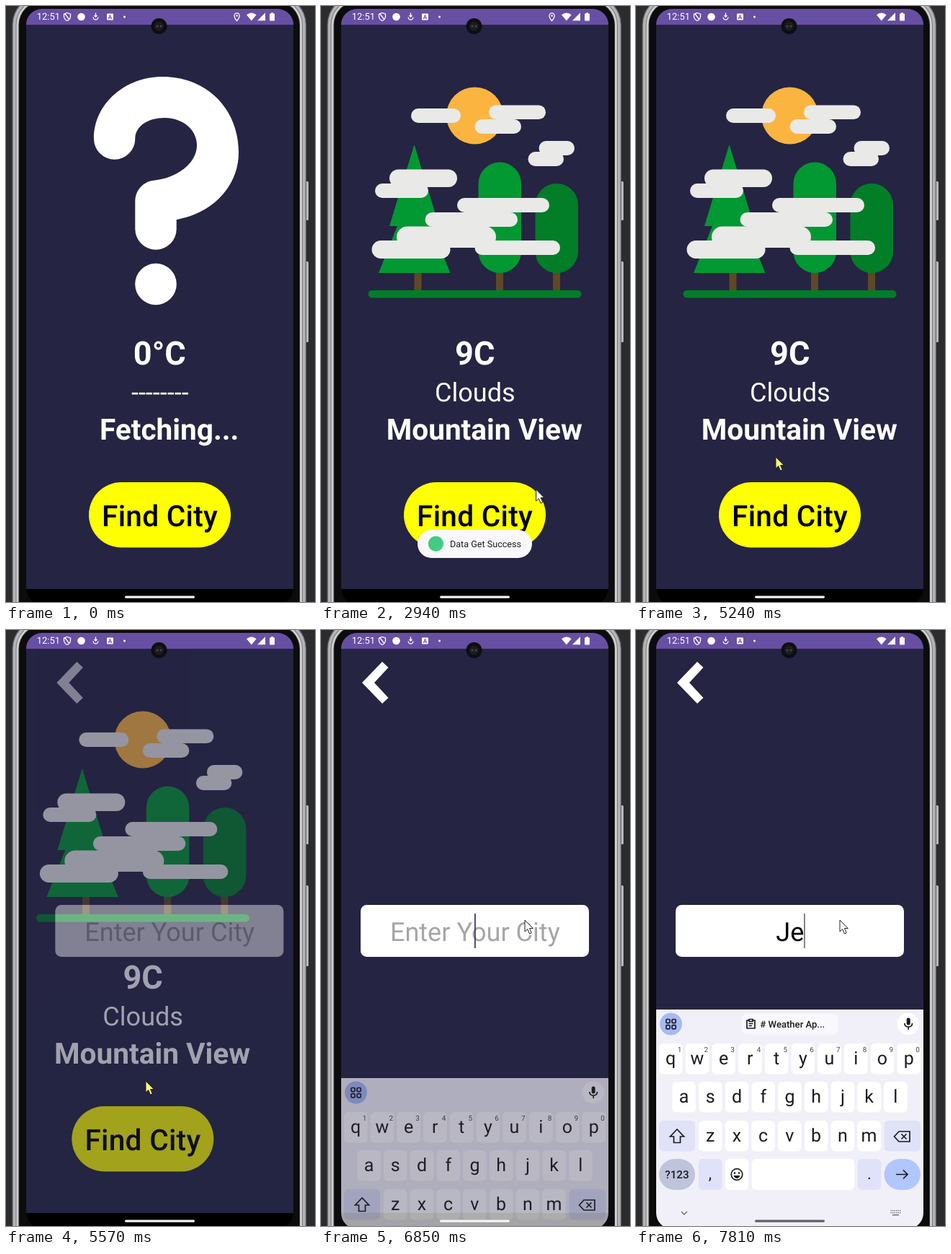
Recreate the animation shown at these times as an HTML page. Size 429 by 826 pixels, loop 8 s.

```html
<!DOCTYPE html>
<html lang="en">
<head>
<meta charset="utf-8">
<title>Weather app</title>
<style>
  html, body { margin: 0; width: 100%; height: 100%; overflow: hidden; background: #2b2c2e; }
  svg { display: block; width: 100vw; height: 100vh; }
  text { font-family: Roboto, sans-serif; text-rendering: geometricPrecision; }
  .mid { text-anchor: middle; }
  .line { fill: none; stroke: #1b1b21; stroke-width: 1.7; }
</style>
</head>
<body>
<svg id="stage" viewBox="0 0 429 826"></svg>
<script>
const LOOP = 8000;
const BG = '#252443', INK = '#1b1b21', TINT = '#dfe2f8';

const rect = (x, y, w, h, r, fill, more = '') =>
  `<rect x="${x}" y="${y}" width="${w}" height="${h}" rx="${r}" fill="${fill}" ${more}/>`;
const disc = (x, y, r, fill) => `<circle cx="${x}" cy="${y}" r="${r}" fill="${fill}"/>`;
const path = (d, fill, more = '') => `<path d="${d}" fill="${fill}" ${more}/>`;
const line = (d, more = '') => `<path d="${d}" class="line" ${more}/>`;
const text = (s, x, y, size, weight, fill, more = 'class="mid"') =>
  `<text x="${x}" y="${y}" font-size="${size}" font-weight="${weight}" fill="${fill}" ${more}>${s}</text>`;
const group = (id, body, more = '') => `<g id="${id}" ${more}>${body}</g>`;
const pill = (x1, y1, x2, y2, fill = '#e9e9e7') => rect(x1, y1, x2 - x1, y2 - y1, (y2 - y1) / 2, fill);

function phone() {
  // Nested outlines, from the outer edge inwards
  const rim = (inset, fill) => rect(8.5 + inset, -15 + inset, 408.5 - 2 * inset, 900, 41 - inset, fill);
  return rect(0, 0, 429, 826, 0, '#2b2c2e') +
    rect(414, 243, 6, 54, 1.5, '#b9b9bb') + rect(414, 354, 6, 112, 1.5, '#b9b9bb') +
    rim(0, '#6a6b6e') + rim(1.3, '#b4b4b6') + rim(5, '#77777a') + rim(6, '#cfcfd1') +
    rim(9, '#2a2a2c') + rim(10, '#0c0c0d');
}

function statusBar() {
  const w = '#fff', thin = 'stroke="#fff" stroke-width="1.3"';
  return rect(28, 4, 371, 22, 0, '#674fa3') +
    text('12:51', 42.7, 19.3, 13, 400, w, '') +
    path('M85 9.5L89.500 11.200V15Q89 18.500 85 20.500Q81 18.500 80.500 15V11.200ZM82 11L88 19', 'none', thin) +
    disc(104.5, 15, 5.3, w) +
    path('M124.500 9.500V15M122.500 13L124.500 15L126.500 13M121 15.500Q121.500 19 124.500 19Q127.500 19 128 15.500', 'none', thin) +
    rect(140, 10.5, 9, 9, 1, w) + text('A', 144.5, 18, 8, 700, '#674fa3') +
    disc(164.5, 15, 1.5, w) +
    group('pin', path('M320.500 20.500Q317 16.500 317 13.500A3.600 3.600 0 0 1 324.200 13.500Q324.200 16.500 320.500 20.500Z', 'none', thin) + disc(320.6, 13.5, 1.2, w)) +
    path('M334 12.200Q340.800 7 347.600 12.200L340.800 20.500Z', w) +
    path('M349 20.300L360 9.300V20.300Z', w) +
    rect(366, 10.5, 7, 10, 1, w) + rect(368, 9.3, 3, 2, 0, w);
}

function unknownIcon() {
  return path('M122 184C122 135 166 98 217 98C280 98 323 144 323 203C323 251 285 288 236.700 296V309' +
    'A28.700 28.700 0 0 1 179.300 309V270C179.300 255 192 242 207 241.500C239 238 265 217 265 193' +
    'C265 171 245 155 220 155C198 155 179.300 166 179.300 184A28.600 28.600 0 0 1 122 184Z', '#fff') +
    disc(208, 385.5, 28.8, '#fff');
}

function cloudyIcon() {
  const leaf = '#029832', dark = '#027d28';
  const clouds = [
    [125, 142, 194, 162], [233, 137.5, 312, 157], [213.5, 157, 278, 177],
    [302.5, 187, 352, 207], [287.5, 202, 337, 222], [95, 226.5, 189, 251],
    [75, 246, 149, 266], [189, 266, 317, 286], [144.5, 286, 273, 306],
    [105, 305.5, 243, 335], [70.5, 325, 179.5, 350], [213.5, 325, 332, 345]];
  return disc(213.5, 152, 39.5, '#fbb440') +
    [129.5, 243, 322].map(x => rect(x, 365, 10, 32, 0, '#5e4826')).join('') +
    path('M129.500 192L164 305H95ZM129.500 246L179.500 370H80Z', leaf) +
    rect(218.5, 216.5, 59.5, 153.5, 29.7, leaf) + rect(297.5, 246, 59.5, 124, 29.7, dark) +
    pill(65.5, 394, 361.5, 404.5, dark) +
    clouds.map(c => pill(...c)).join('');
}

function homeScreen() {
  const reading = (temp, sky, city, tempX) =>
    text(temp, tempX, 497, 45.1, 700, '#fff') + text(sky, 213.8, 547.5, 36.1, 400, '#fff') +
    text(city, 226.7, 600.7, 40.6, 700, '#fff');
  return group('before', unknownIcon() + reading('0°C', '--------', 'Fetching...', 213.3)) +
    group('after', cloudyIcon() + reading('9C', 'Clouds', 'Mountain View', 213.8)) +
    rect(115, 660, 197, 90.5, 45.2, '#ff0') +
    '<circle id="ripple" cx="205" cy="695" fill="#000" clip-path="url(#buttonShape)"/>' +
    text('Find City', 213.6, 721, 40.6, 500, '#000', 'class="mid" letter-spacing=".29"');
}

function searchScreen() {
  return rect(28, 26, 371, 782, 0, BG) +
    path('M85 44L57 73L85 102L93.500 94L74 73L93.500 52Z', '#fff') +
    rect(55, 381, 317, 72, 8.5, '#fff') +
    text('', 213.8, 431, 36.1, 400, '#000', 'class="mid" id="field"') +
    rect(0, 393, 1.8, 48, 0, '#3b4262', 'id="caret"');
}

function keyboard() {
  const letters = (row, x0, y) => [...row].map((c, i) => {
    const x = x0 + 36.72 * i;
    return rect(x, y, 32.5, 42.5, 6, '#fff') + text(c, x + 16.2, y + 29, 25, 400, INK, 'class="mid letter"');
  }).join('');
  const digits = [...'1234567890'].map((d, i) => text(d, 60.5 + 36.72 * i, 584.5, 10, 400, '#45464f')).join('');
  const squares = [41.8, 50].map(x => [539.5, 547.7].map(y =>
    rect(x, y, 5.2, 5.2, 1.5, 'none', 'class="line"')).join('')).join('');
  const chip = rect(147, 532, 133.5, 28.5, 7, '#f9f8fe') +
    line('M157 541H154V552H165V541H162M157 539.500H162V542.500H157ZM156.500 545.500H162.500M156.500 548.500H161', 'stroke-width="1.4"') +
    text('# Weather Ap...', 172.3, 550.6, 13.1, 500, INK, '');
  const grey = '#6a6b73';
  const dots = [0, 1, 2, 3, 4, 5].map(i => rect(353.5 + 2.5 * i, 804, 1.4, 1.4, 0, grey) +
    rect(353.5 + 2.5 * i, 807, 1.4, 1.4, 0, grey)).join('');
  return rect(28, 526, 371, 310, 0, '#f1f0f8') +
    disc(48.5, 546, 15.5, '#a8baf4') + squares + group('chip', chip) +
    disc(378, 546, 15.2, '#fff') + rect(375.7, 537.5, 5, 10, 2.5, INK) +
    line('M372.800 545Q373 550 378.200 550Q383.400 550 383.600 545M378.200 550V554') +
    letters('qwertyuiop', 32, 573) + digits +
    letters('asdfghjkl', 50.4, 626) + letters('zxcvbnm', 87, 680) +
    rect(32, 680, 50, 42.5, 6, TINT) + line('M57 692L47.500 702H52.500V710.500H61.500V702H66.500Z') +
    rect(344.5, 680, 50.5, 42.5, 6, TINT) +
    line('M365 695H380V709H365L358.500 702ZM368.500 698.500L375.500 705.500M375.500 698.500L368.500 705.500') +
    rect(32, 733, 50, 43, 21.5, '#bfc4dc') + text('?123', 57, 759.7, 15.2, 500, INK) +
    rect(87, 733, 32.5, 43, 6, TINT) + text(',', 103, 761, 22, 400, INK) +
    rect(123.8, 733, 32.5, 43, 6, '#fff') +
    '<circle cx="140" cy="754.500" r="7.800" class="line"/>' + disc(137, 752.5, 1.3, INK) + disc(143, 752.5, 1.3, INK) +
    path('M135.500 756H144.500Q143 760 140 760Q137 760 135.500 756Z', INK) +
    rect(160.7, 733, 142.5, 43, 6, '#fff') +
    rect(307.7, 733, 32.5, 43, 6, TINT) + text('.', 324, 761, 22, 400, INK) +
    rect(344.5, 733, 50.5, 43, 21.5, '#b1c5ff') + line('M361 754.500H377M371 748.500L377 754.500L371 760.500') +
    path('M63 806L67 810L71 806', 'none', `stroke="${grey}" stroke-width="1.4"`) +
    dots + rect(356, 810, 9, 1.4, 0, grey);
}

function toast() {
  return rect(134, 726, 159, 39, 19.5, '#f9f8fd') + disc(159.5, 745.3, 10.6, '#41cb83') +
    text('Data Get Success', 179, 750, 12.6, 400, '#1c1b1f', '');
}

document.getElementById('stage').innerHTML = `
  <defs>
    <clipPath id="screenShape">${rect(28, 4, 371, 826, 22, '#000')}</clipPath>
    <clipPath id="buttonShape">${rect(115, 660, 197, 90.5, 45.2, '#000')}</clipPath>
  </defs>` + phone() +
  group('screen', rect(28, 4, 371, 826, 0, BG) + rect(28, 808, 371, 22, 0, '#000') +
    group('home', homeScreen()) + group('search', searchScreen()) + statusBar() +
    group('keys', keyboard()) + group('toast', toast()) +
    rect(165, 817.5, 97, 3.2, 1.6, '#f4f4f4', 'id="handle"'), 'clip-path="url(#screenShape)"') +
  disc(212.5, 28, 11, '#0e0e11') + disc(212.5, 28, 6.5, '#1c1c20') +
  disc(210, 28, 1.5, '#45454c') + disc(215, 28, 1.5, '#45454c') +
  group('cursor', path('M0 0V16L3.700 12.600L6.500 19L9.200 17.800L6.500 11.500H11.300Z', '#fff',
    'id="arrow" stroke="#222" stroke-width="1" stroke-linejoin="round"'));

const $ = id => document.getElementById(id);
const set = (id, attrs) => { for (const k in attrs) $(id).setAttribute(k, attrs[k]); };
const show = (id, on) => set(id, { visibility: on ? 'visible' : 'hidden' });
const ramp = (t, a, b) => Math.min(1, Math.max(0, (t - a) / (b - a)));
const easeOut = (p, n) => 1 - (1 - p) ** n;
const letterKeys = [...document.querySelectorAll('.letter')].map(el => ({ el, c: el.textContent }));

// Pointer path: time, x, y
const route = [
  [500, 188, 706], [700, 211, 701], [1640, 211, 701], [1780, 310, 642],
  [1970, 310, 642], [2180, 411, 583], [2310, 411, 583], [3150, 278, 686],
  [3210, 278, 686], [3750, 267, 689], [4230, 267, 689], [4560, 168, 484],
  [4900, 205, 695], [5030, 205, 695], [5240, 194, 625], [5860, 194, 625], [6240, 283, 402], [LOOP, 283, 402]];

function pointer(t) {
  const i = Math.max(1, route.findIndex(k => k[0] >= t));
  const [t0, x0, y0] = route[i - 1], [t1, x1, y1] = route[i];
  const p = ramp(t, t0, t1), s = p * p * (3 - 2 * p);
  return [x0 + (x1 - x0) * s, y0 + (y1 - y0) * s];
}

function draw(t) {
  show('before', t < 1100);
  show('after', t >= 1100);
  show('pin', t < 4900);
  set('toast', { opacity: ramp(t, 1080, 1480) * (1 - ramp(t, 3280, 3700)) });
  set('ripple', { r: 200 * easeOut(ramp(t, 4950, 5200), 2), opacity: 0.1 * (1 - ramp(t, 5080, 5240)) });

  const slide = 37 * easeOut(ramp(t, 5490, 5850), 4);
  set('home', { transform: `translate(${-slide})` });
  set('search', { transform: `translate(${37 - slide})`, opacity: ramp(t, 5520, 5640) });

  const typed = t < 7540 ? '' : t < 7740 ? 'J' : 'Je';
  $('field').textContent = typed || 'Enter Your City';
  set('field', { fill: typed ? '#000' : '#a6a6a6' });
  show('caret', t >= 6380 && t < 6940 || t >= 7470);
  set('caret', { x: typed === 'Je' ? 233 : typed ? 223 : 213, fill: typed ? '#77777c' : '#3b4262' });

  const rise = ramp(t, 6920, 7210);
  show('keys', t >= 6850);
  set('keys', { transform: `translate(0 ${95 * (1 - rise) ** 2})`, opacity: 0.68 + 0.32 * rise });
  set('chip', { opacity: ramp(t, 7080, 7200) });
  set('handle', { fill: t >= 7060 ? '#5f6069' : '#f4f4f4' });
  const shifted = t >= 7470 && t < 7610;
  for (const { el, c } of letterKeys) el.textContent = shifted ? c.toUpperCase() : c;

  show('cursor', t >= 500);
  set('cursor', { transform: `translate(${pointer(t)})` });
  set('arrow', { fill: t > 4200 && t < 6240 ? '#fffb7a' : '#fff' });
}

const start = performance.now();
function frame() {
  draw((performance.now() - start) % LOOP);
  requestAnimationFrame(frame);
}
frame();
</script>
</body>
</html>
```
